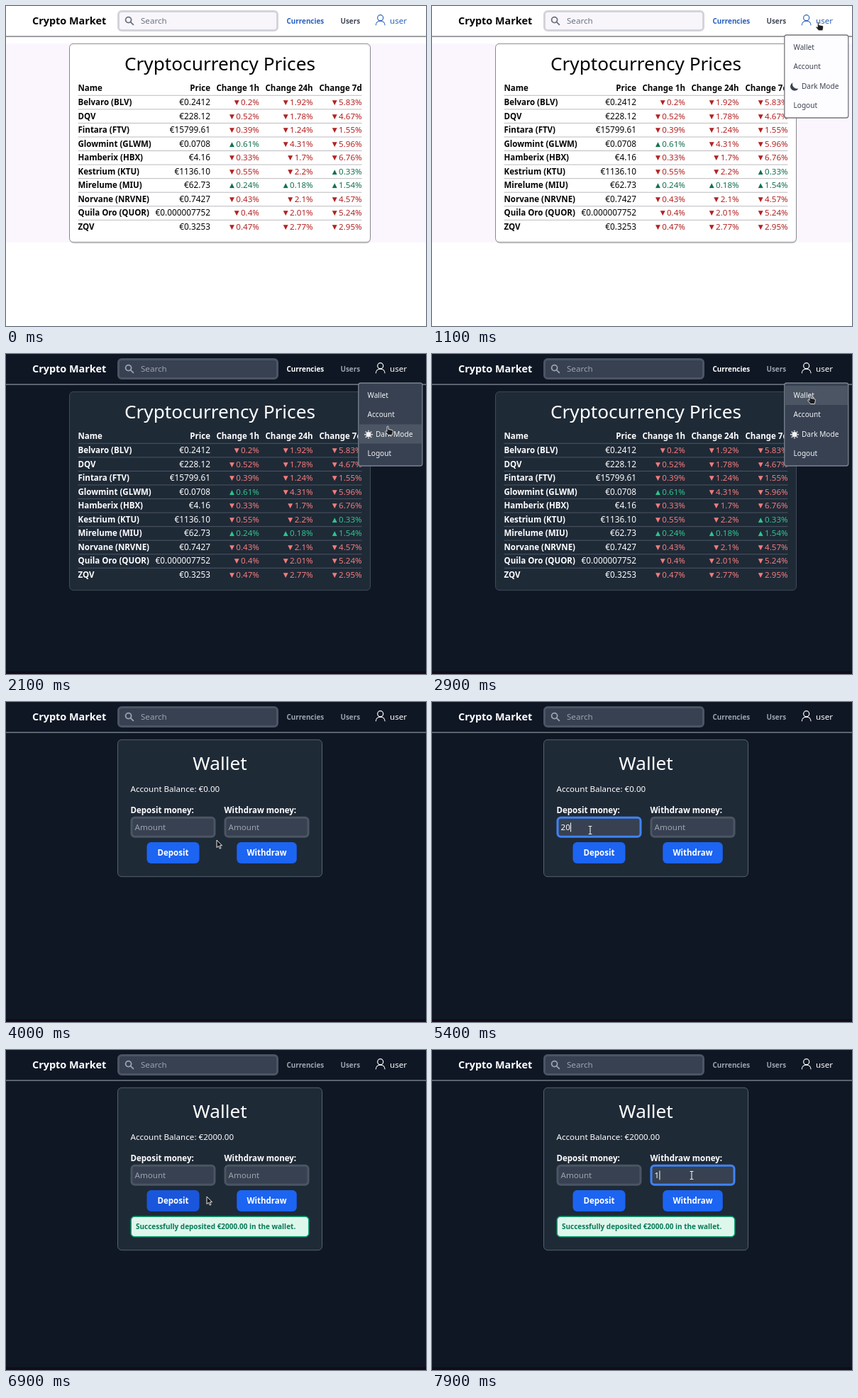
Write an HTML page that moves like this. It is 592 px wide and 452 px high and loops after 8000 ms.

```html
<!DOCTYPE html>
<html lang="en">
<head>
<meta charset="utf-8">
<title>Crypto Market</title>
<style>
html, body { margin: 0; width: 100%; height: 100%; overflow: hidden; }
svg {
  display: block; width: 592px; height: 452px;
  font: 11.6px "Noto Sans", "Open Sans", sans-serif;
  --page: #fff; --band: #fbf6fd; --strip: #fff; --line: #77777d; --text: #050505;
  --card: #fff; --edge: #86868b; --rule: #bcbcc1; --field: #f8f6fb; --ring: #d3d4da;
  --hint: #6b7280; --link: #2a62c0; --user: #2a62c0; --nav: #434a57;
  --down: #b32222; --up: #14704f; --menu: #fdfcff; --item: #3b4250; --hover: #cfd2d8; --shade: .1;
}
svg.dark {
  --page: #0f1724; --band: #0f1724; --strip: #120b18; --line: #7b8390; --text: #fff;
  --card: #1f2a37; --edge: #3f4a59; --rule: #4b5563; --field: #374151; --ring: #4b5563;
  --hint: #9ca3af; --link: #fff; --user: #fff; --nav: #9ca3af;
  --down: #f47c7c; --up: #31c48d; --menu: #374151; --item: #f3f4f6; --hover: #4b5563; --shade: 0;
}
text { fill: var(--text); white-space: pre; }
.b { font-weight: 700; font-size: 11.5px; }
.m { font-weight: 600; font-size: 11.5px; }
.h { font-size: 26.2px; text-anchor: middle; }
.n { font-weight: 600; font-size: 9.9px; }
.i { font-weight: 500; font-size: 10.1px; fill: var(--item); }
.p { font-size: 11.8px; }
.e { text-anchor: end; }
.c { text-anchor: middle; fill: #fff; }
.down { fill: var(--down); }
.up { fill: var(--up); }
.hint { fill: var(--hint); }
.tri { font: 9px "DejaVu Sans", sans-serif; }
.card { fill: var(--card); stroke: var(--edge); }
.field { fill: var(--field); stroke: var(--ring); stroke-width: 3; }
</style>
</head>
<body>
<svg id="app" viewBox="0 0 592 452">
  <rect width="592" height="452" fill="var(--page)"/>
  <rect y="53" width="592" height="281" fill="var(--band)"/>
  <rect y="448" width="592" height="4" fill="var(--strip)"/>
  <rect y="42.3" width="592" height="1.4" fill="var(--line)"/>
  <text x="37" y="26" class="b" style="font-size:14.4px">Crypto Market</text>
  <rect x="158.5" y="7.5" width="224" height="27" rx="4.5" class="field"/>
  <g fill="none" stroke="var(--hint)" stroke-width="1.8" stroke-linecap="round">
    <circle cx="172.6" cy="19.6" r="4"/><path d="M175.8 22.8l3.6 3.6"/>
  </g>
  <text x="190" y="25" class="hint">Search</text>
  <text id="navCoins" x="395.5" y="24.5" class="n">Currencies</text>
  <text x="471.5" y="24.5" class="n" style="fill:var(--nav)">Users</text>
  <g fill="none" stroke="var(--user)" stroke-width="1.2">
    <circle cx="527.7" cy="16.7" r="4"/><path d="M521.3 27.2c0-8.2 12.8-8.2 12.8 0"/>
  </g>
  <text x="541" y="25" style="fill:var(--user)">user</text>

  <g id="prices">
    <rect x="90" y="55" width="424" height="281" rx="6" opacity="var(--shade)"/>
    <rect x="89.5" y="53.3" width="424" height="280.4" rx="5.5" class="card"/>
    <text x="301.5" y="91" class="h">Cryptocurrency Prices</text>
  </g>

  <g id="wallet">
    <rect id="panel" x="157.5" y="53.3" width="288" class="card" rx="5.5" style="stroke:#566170"/>
    <text x="301.5" y="96" class="h">Wallet</text>
    <text id="balance" x="175.5" y="126.5"></text>
    <text x="175.5" y="157" class="m">Deposit money:</text>
    <text x="307.5" y="157" class="m">Withdraw money:</text>
    <rect id="inBox" x="177" y="163.2" width="117" height="27" rx="4.5" class="field"/>
    <rect id="outBox" x="309" y="163.2" width="117" height="27" rx="4.5" class="field"/>
    <text id="inText" x="181.5" y="181"></text>
    <text id="outText" x="313.5" y="181"></text>
    <rect id="caret" y="170.5" width="1" height="13" fill="#fff"/>
    <rect id="inBtn" x="198.5" y="198" width="74" height="30" rx="6"/>
    <rect x="325.3" y="198" width="84.5" height="30" rx="6" fill="#1c64f2"/>
    <text x="235.5" y="217" class="m c">Deposit</text>
    <text x="367.5" y="217" class="m c">Withdraw</text>
    <g id="notice">
      <rect x="176.2" y="235.2" width="250.6" height="28.6" rx="5" fill="#def7ec" stroke="#0e9f6e" stroke-width="1.5"/>
      <text x="183" y="253" class="m" style="font-size:9.98px;fill:#057a55">Successfully deposited €2000.00 in the wallet.</text>
    </g>
  </g>

  <g id="menu">
    <rect x="496.8" y="41" width="90" height="117" rx="3" fill="var(--menu)" stroke="var(--line)" stroke-width="1.3"/>
    <rect id="glow" x="497.5" width="88.6" height="27.3" fill="var(--hover)"/>
    <text x="509.5" y="61.5" class="i">Wallet</text>
    <text x="509.5" y="89" class="i">Account</text>
    <text x="521" y="116.5" class="i">Dark Mode</text>
    <text x="509.5" y="144" class="i">Logout</text>
    <path id="moon" d="M508.6 108.2A6 6 0 1 0 516.4 116.4A6.2 6.2 0 0 1 508.6 108.2Z" fill="var(--item)"/>
    <g id="sun" fill="var(--item)" stroke="var(--item)" stroke-width="1.4" stroke-linecap="round">
      <circle cx="511" cy="113.7" r="2.9"/>
    </g>
  </g>

  <g id="cursor">
    <path id="arrow" d="M0 0V10.6L2.5 8.4L4.3 12.2L6 11.4L4.3 7.8H7.6Z" fill="#111" stroke="#fff" stroke-width=".9"/>
    <path id="hand" d="M-1 1C-1-.4 1-.4 1 1V4.4L6 5.4Q7.6 5.8 7.4 7.6L6.4 12.5H.6L-3 8.2C-3.8 7-2.4 6.2-1.6 7L-1 7.6Z" fill="#1d1d22" stroke="#fff" stroke-width=".8"/>
    <path id="beam" d="M-2.4-5.5H-.6L0-5L.6-5.5H2.4M0-5V5M-2.4 5.5H-.6L0 5L.6 5.5H2.4" fill="none" stroke="#f1f2f4" stroke-width="1.1"/>
  </g>
</svg>
<script>
const NS = "http://www.w3.org/2000/svg";
const LOOP = 8000, STEP = 100;
const $ = id => document.getElementById(id);

function add(parent, tag, attrs, text = "") {
  const el = document.createElementNS(NS, tag);
  for (const k in attrs) el.setAttribute(k, attrs[k]);
  el.textContent = text;
  parent.append(el);
  return el;
}

// name, price, change 1h, 24h, 7d
const coins = `Belvaro (BLV)|0.2412|-0.2|-1.92|-5.83
DQV|228.12|-0.52|-1.78|-4.67
Fintara (FTV)|15799.61|-0.39|-1.24|-1.55
Glowmint (GLWM)|0.0708|0.61|-4.31|-5.96
Hamberix (HBX)|4.16|-0.33|-1.7|-6.76
Kestrium (KTU)|1136.10|-0.55|-2.2|0.33
Mirelume (MIU)|62.73|0.24|0.18|1.54
Norvane (NRVNE)|0.7427|-0.43|-2.1|-4.57
Quila Oro (QUOR)|0.000007752|-0.4|-2.01|-5.24
ZQV|0.3253|-0.47|-2.77|-2.95`.split("\n").map(r => r.split("|"));
const rights = [288, 357, 432.7, 501.7];

function buildTable() {
  const box = $("prices");
  add(box, "text", { x: 101.5, y: 120.3, class: "b" }, "Name");
  ["Price", "Change 1h", "Change 24h", "Change 7d"].forEach((s, i) =>
    add(box, "text", { x: rights[i], y: 120.3, class: "b e" }, s));
  coins.forEach(([name, price, ...changes], row) => {
    const y = 140 + row * 19.56;
    add(box, "rect", { x: 101.5, y: y - 14.2, width: 400, height: 1, fill: "var(--rule)" });
    add(box, "text", { x: 101.5, y, class: "b" }, name);
    add(box, "text", { x: rights[0], y, class: "p e" }, "€" + price);
    changes.forEach((c, i) => {
      const dir = c[0] === "-" ? "down" : "up";
      const cell = add(box, "text", { x: rights[i + 1], y, class: "e " + dir });
      add(cell, "tspan", { class: "tri", dy: -1 }, dir === "up" ? "▲" : "▼");
      add(cell, "tspan", { dx: 2.4, dy: 1 }, c.replace("-", "") + "%");
    });
  });
}

function buildSun() {
  for (let a = 0; a < 8; a++)
    add($("sun"), "path", { d: "M0-4.6V-5.4", transform: `translate(511 113.7) rotate(${a * 45})` });
}

// time, x, y, cursor shape from then on
const moves = [
  [100, 300, 300, "arrow"], [800, 538, 28, "hand"], [900, 543, 19, "hand"], [1200, 545, 24, "hand"],
  [1700, 538, 102, "hand"], [2400, 538, 102, "hand"], [2900, 533, 58, "hand"], [3400, 533, 58, "arrow"],
  [4000, 297, 195, "arrow"], [4200, 284, 190, "arrow"], [4300, 270, 184, "beam"], [4600, 223, 181, "beam"],
  [5400, 223, 181, "beam"], [5600, 222, 188, "beam"], [5700, 219, 196, "arrow"], [5800, 219, 196, "arrow"],
  [5900, 224, 203, "hand"], [6100, 235, 212, "hand"], [6500, 235, 212, "hand"], [6800, 274, 208, "arrow"],
  [6900, 283, 207, "arrow"], [7100, 312, 195, "arrow"], [7200, 326, 187, "beam"], [7500, 366, 177, "beam"],
  [LOOP, 366, 177, "beam"]
];
// time, text in the field, null when not focused
const deposit = [[0, null], [4600, ""], [5000, "2"], [5300, "20"], [5500, "200"], [5600, "2000"], [6300, null]];
const withdraw = [[0, null], [7500, ""], [7900, "1"]];

const last = (list, t) => list.filter(k => k[0] <= t).pop();
const show = (id, on) => $(id).style.display = on ? "" : "none";

function pointer(t) {
  const a = last(moves, t);
  if (!a) return null;
  const b = moves[moves.indexOf(a) + 1] || a;
  const p = b === a ? 0 : (t - a[0]) / (b[0] - a[0]);
  return { x: a[1] + (b[1] - a[1]) * p, y: a[2] + (b[2] - a[2]) * p, shape: a[3] };
}

function field(id, value) {
  const focused = value !== null, label = $(id + "Text");
  $(id + "Box").style.stroke = focused ? "#3f83f8" : "";
  label.textContent = value || "Amount";
  label.setAttribute("class", value ? "" : "hint");
  if (focused) {
    const w = value ? label.getComputedTextLength() : 0;
    $("caret").setAttribute("x", +label.getAttribute("x") + w + .3);
  }
  return focused;
}

function draw(t) {
  const dark = t >= 2100, wallet = t >= 3400, paid = t >= 6300, menu = t >= 1000 && !wallet;
  $("app").setAttribute("class", dark ? "dark" : "");
  $("navCoins").style.fill = wallet ? "var(--nav)" : "var(--link)";
  show("prices", !wallet);
  show("wallet", wallet);
  show("menu", menu);
  show("moon", !dark);
  show("sun", dark);

  const p = pointer(t);
  show("cursor", p);
  if (p) {
    $("cursor").setAttribute("transform", `translate(${p.x} ${p.y})`);
    for (const s of ["arrow", "hand", "beam"]) show(s, s === p.shape);
    const row = Math.floor((p.y - 45) / 27.3);
    show("glow", menu && row >= 0 && row < 4);
    $("glow").setAttribute("y", 44.7 + row * 27.3);
  }

  if (wallet) {
    const a = field("in", last(deposit, t)[1]), b = field("out", last(withdraw, t)[1]);
    show("caret", a || b);
    show("notice", paid);
    $("panel").setAttribute("height", paid ? 229.4 : 193.4);
    $("balance").textContent = "Account Balance: €" + (paid ? "2000.00" : "0.00");
    $("inBtn").setAttribute("fill", t >= 5900 && t < 7000 ? "#1a56db" : "#1c64f2");
  }
}

buildTable();
buildSun();
const start = performance.now();
function tick() {
  const t = (performance.now() - start) % LOOP;
  draw(Math.floor(t / STEP) * STEP);
  requestAnimationFrame(tick);
}
tick();
</script>
</body>
</html>
```
